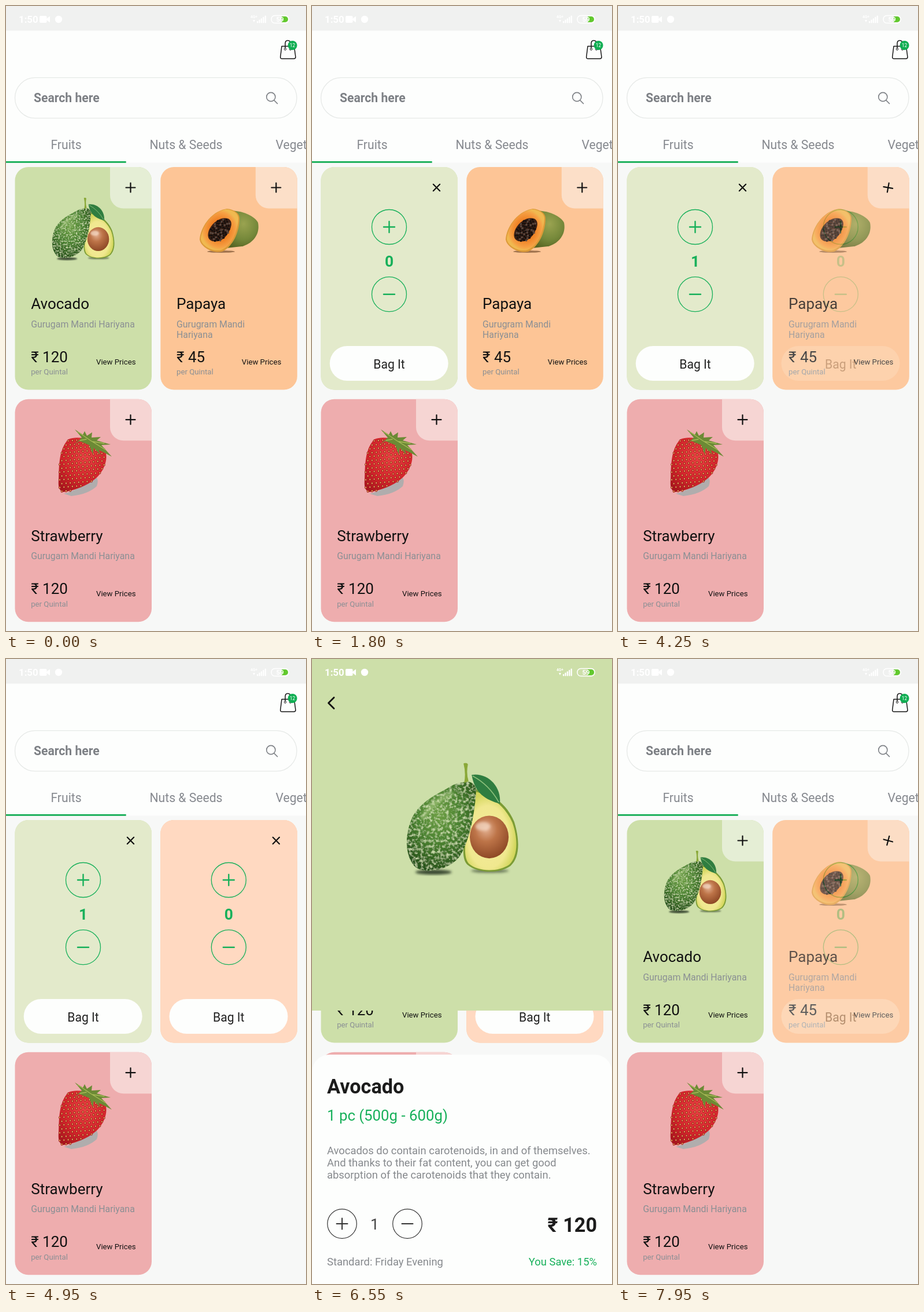
An HTML page that plays this animation: 519x1079 px, repeating every 8 s.

```html
<!DOCTYPE html>
<html lang="en">
<head>
<meta charset="utf-8">
<title>Fruit market</title>
<style>
html, body { margin: 0; width: 100%; height: 100%; overflow: hidden; background: #f7f8f7; }
svg { display: block; }
text { font-family: Roboto, sans-serif; }
.b { font-weight: 700; }
.mid { text-anchor: middle; }
.end { text-anchor: end; }
.line { fill: none; stroke-linecap: round; stroke-linejoin: round; }
</style>
</head>
<body>
<svg id="stage" width="519" height="1079" viewBox="0 0 519 1079">
  <defs>
    <radialGradient id="skin" cx=".46" cy=".36" r=".64">
      <stop offset="0" stop-color="#6fa046"/><stop offset=".5" stop-color="#4a8230"/><stop offset="1" stop-color="#28541b"/>
    </radialGradient>
    <radialGradient id="flesh" cx=".45" cy=".58" r=".55">
      <stop offset="0" stop-color="#f4ec9c"/><stop offset=".72" stop-color="#f0e88f"/><stop offset="1" stop-color="#d2d65c"/>
    </radialGradient>
    <radialGradient id="pit" cx=".42" cy=".32" r=".72">
      <stop offset="0" stop-color="#e3b091"/><stop offset=".4" stop-color="#bd7448"/><stop offset="1" stop-color="#8a4523"/>
    </radialGradient>
    <radialGradient id="rind" cx=".55" cy=".35" r=".7">
      <stop offset="0" stop-color="#9aa350"/><stop offset=".6" stop-color="#75883a"/><stop offset="1" stop-color="#566422"/>
    </radialGradient>
    <radialGradient id="pulp">
      <stop offset=".5" stop-color="#ef8226"/><stop offset=".85" stop-color="#f6a044"/><stop offset="1" stop-color="#f0b950"/>
    </radialGradient>
    <radialGradient id="berry" cx=".55" cy=".35" r=".75">
      <stop offset="0" stop-color="#e84443"/><stop offset=".6" stop-color="#d3252b"/><stop offset="1" stop-color="#a8161d"/>
    </radialGradient>
    <filter id="soft" x="-30%" y="-80%" width="160%" height="260%"><feGaussianBlur stdDeviation="2"/></filter>
    <filter id="rough" x="0" y="0" width="100%" height="100%">
      <feTurbulence type="fractalNoise" baseFrequency=".22" numOctaves="2" seed="4"/>
      <feColorMatrix values="0 0 0 0 .72  0 0 0 0 .85  0 0 0 0 .5  0 2.2 0 0 -1"/>
      <feComposite in2="SourceGraphic" operator="in" result="grain"/>
      <feMerge><feMergeNode in="SourceGraphic"/><feMergeNode in="grain"/></feMerge>
    </filter>

    <symbol id="avocado" viewBox="149 205 180 180">
      <g filter="url(#soft)" fill="#3b4a33">
        <ellipse cx="193" cy="379" rx="29" ry="4"/><ellipse cx="283" cy="377" rx="30" ry="3" opacity=".7"/>
      </g>
      <path d="M256 246C284 250 311 271 322 299C331 328 331 356 316 369C298 382 263 381 247 367C233 353 245 312 256 246Z" fill="#7c9c35"/>
      <path d="M256 250C282 254 307 273 319 300C329 328 327 355 314 367C297 379 264 379 249 365C237 350 247 312 256 250Z" fill="url(#flesh)"/>
      <path d="M240 236C250 232 262 238 261 250C259 286 250 332 234 355C216 377 180 382 164 371C146 352 147 317 160 290C174 264 203 253 219 243C227 238 233 237 240 236Z" fill="url(#skin)" filter="url(#rough)"/>
      <path class="line" d="M176 292Q190 268 222 254" stroke="#c3dc9b" stroke-width="7" opacity=".45" filter="url(#soft)"/>
      <ellipse cx="282" cy="323" rx="31" ry="34" fill="url(#pit)"/>
      <ellipse cx="272" cy="306" rx="12" ry="7" fill="#f6dcc8" opacity=".7" filter="url(#soft)"/>
      <path d="M241 206Q245 203 248 207Q245 221 249 234L242 237Q245 221 241 206Z" fill="#8aa838"/>
      <path d="M254 224C278 220 302 241 299 270C277 264 259 254 254 224Z" fill="#2f7d40"/>
      <path class="line" d="M256 226Q282 240 297 267" stroke="#8cbf7a" stroke-width="1.5"/>
    </symbol>
    <symbol id="papaya" viewBox="335 349 103 78">
      <ellipse cx="372" cy="424" rx="24" ry="2" fill="#7a5230" opacity=".7"/>
      <path d="M388 354C406 352 430 362 436 374C440 394 427 410 408 415L380 418Z" fill="url(#rind)"/>
      <path d="M382 350C394 351 404 357 404 367C404 390 392 416 374 424C357 428 337 416 335 403C336 385 352 355 382 350Z" fill="#dc9a38"/>
      <path d="M381 351C393 352 402 358 402 367C401 389 390 414 373 421C357 425 338 414 337 402C338 385 353 356 381 351Z" fill="url(#pulp)"/>
      <path d="M384 367C393 371 390 382 385 391C378 403 369 408 357 406C348 403 348 394 352 385C359 372 372 364 384 367Z" fill="#3a2016"/>
      <g id="pips"/>
    </symbol>
    <symbol id="strawberry" viewBox="90 730 94 117">
      <path d="M100 842Q130 834 152 812Q162 814 157 829Q142 843 113 846Z" fill="#b0adad"/>
      <path id="berryShape" d="M108 748C124 741 152 747 170 764C178 778 172 800 156 815C140 829 116 837 99 839C92 837 90 830 91 818C92 798 90 766 108 748Z" fill="url(#berry)"/>
      <g id="seeds"/>
      <path d="M119 731L133 740L136 734L140 742L149 736L148 745L164 744L157 750L181 757L165 758L183 778L160 766L164 775L152 763L150 774L144 758L127 751L118 757L131 745Z" fill="#6c8a35"/>
      <path class="line" d="M124 735L146 750L172 766M139 748L128 750M150 752L170 755" stroke="#a9bb58" stroke-width="1.3"/>
    </symbol>
  </defs>
</svg>
<script>
const GREEN = '#17b05a', LOOP = 8000;
const $ = id => document.getElementById(id);
const txt = (x, y, size, fill, s, cls = '') =>
  `<text x="${x}" y="${y}" font-size="${size}" fill="${fill}" class="${cls}">${s}</text>`;
const line = (d, stroke, w) => `<path class="line" d="${d}" stroke="${stroke}" stroke-width="${w}"/>`;
const round = (id, x, y, r, color, d, w, ring) =>
  `<circle id="${id}" cx="${x}" cy="${y}" r="${r}" fill="#000" fill-opacity="0" stroke="${color}" stroke-width="${ring}"/>` +
  line(`M${x - d} ${y}h${2 * d}` + (id.startsWith('plus') ? `M${x} ${y - d}v${2 * d}` : ''), color, w);

// Card drawn relative to its top left corner
function card(c) {
  const place = c.place.map((s, i) => txt(27.7, 276.5 + 18.7 * i, 15.86, '#8a8f94', s)).join('');
  const [ix, iy, iw, ih] = c.box;
  return `<g transform="translate(${c.x} ${c.y})">
    <rect width="236.5" height="384.5" rx="23" fill="${c.color}"/>
    <use href="#${c.fruit}" x="${ix - c.x}" y="${iy - c.y}" width="${iw}" height="${ih}"/>
    ${txt(27.7, 245, 26, '#111', c.name)}${place}
    ${txt(27.7, 336.5, 26, '#111', '₹ ' + c.price)}${txt(27.7, 358, 13.2, '#8a8f94', 'per Quintal')}
    ${txt(209, 340.5, 13.2, '#111', 'View Prices', 'end')}
    <path d="M164.5 0H213.5A23 23 0 0 1 236.5 23V71.5H187.5A23 23 0 0 1 164.5 48.5Z" fill="${c.corner}"/>
    <g id="over${c.id}" opacity="0">
      <rect width="236.5" height="384.5" rx="23" fill="${c.pale}"/>
      ${round('plus' + c.id, 118, 103.5, 30, GREEN, 9.5, 2.4, 1.3)}
      ${round('minus' + c.id, 118, 219.7, 30, GREEN, 9.5, 2.4, 1.3)}
      <text id="count${c.id}" x="118" y="171.5" font-size="26.4" fill="${GREEN}" class="b mid">0</text>
      <rect x="15.2" y="309" width="205" height="60" rx="30" fill="#fdfefd"/>
      ${txt(118, 347.5, 21.15, '#222', 'Bag It', 'mid')}
    </g>
    <g id="cross${c.id}">${line('M192 35.5h16M200 27.5v16', '#111', 2.2)}</g>
  </g>`;
}

const cards = [
  { id: 0, x: 15.5, y: 278, fruit: 'avocado', name: 'Avocado', price: 120, place: ['Gurugam Mandi Hariyana'],
    color: '#cddfa9', corner: '#e5eed5', pale: '#e3eacb', box: [79, 331, 109, 109] },
  { id: 1, x: 267.3, y: 278, fruit: 'papaya', name: 'Papaya', price: 45, place: ['Gurugram Mandi', 'Hariyana'],
    color: '#fdc596', corner: '#fcdfc8', pale: '#ffd9c1', box: [335, 349, 103, 78] },
  { id: 2, x: 15.5, y: 678.7, fruit: 'strawberry', name: 'Strawberry', price: 120, place: ['Gurugam Mandi Hariyana'],
    color: '#eeadae', corner: '#f6d5d3', pale: '#f6d5d3', box: [90, 730, 94, 117] }
];

const header = `
  <rect width="519" height="1079" fill="#f7f8f7"/><rect width="519" height="270.5" fill="#fdfefd"/>
  <rect width="519" height="42.5" fill="#f0f1f0"/>
  <rect x="15.5" y="123.7" width="487.5" height="70" rx="35" fill="#fdfefd" stroke="#e6e9e7" stroke-width="1.3"/>
  ${txt(48, 166.3, 21.15, '#7d8085', 'Search here', 'b')}
  <circle cx="458.3" cy="157" r="7.6" fill="none" stroke="#7d8085" stroke-width="1.6"/>${line('M464 163l5.5 5.5', '#7d8085', 1.7)}
  ${txt(104, 246.5, 21.15, '#86898f', 'Fruits', 'mid')}${txt(311.5, 246.5, 21.15, '#86898f', 'Nuts &amp; Seeds', 'mid')}
  ${txt(466.5, 246.5, 21.15, '#86898f', 'Vegetables')}
  <rect y="268" width="207.7" height="2.8" fill="#14ad55"/>
  ${line('M477 69.5H498.5L501 88Q501 91 498 91H477.5Q474.5 91 474.7 88ZM483 74V65Q483 59.5 487.5 59.5T492 65V74', '#151515', 1.5)}
  <circle cx="483" cy="74.5" r="1.7" fill="#fff" stroke="#151515"/><circle cx="492" cy="74.5" r="1.7" fill="#fff" stroke="#151515"/>
  <circle cx="495.6" cy="68" r="8" fill="#0fae52"/>${txt(495.6, 71, 8.5, '#fff', '12', 'mid')}`;

const status = `<g fill="#fff">${txt(22, 29, 16.8, '#fff', '1:50', 'b')}
  <rect x="58" y="17" width="12.5" height="12" rx="2"/><path d="M70 22l6-4.5v11l-6-4.5z"/><circle cx="91" cy="23" r="6.2"/>
  ${txt(423, 21, 6.5, '#fff', '4G+', 'b')}<path d="M427 24l2 4 2-4z"/>
  ${[0, 1, 2, 3, 4].map(i => `<rect x="${434 + i * 3.4}" y="${26 - i * 2.4}" width="2.3" height="${3.5 + i * 2.4}" rx="1"/>`).join('')}
  <rect x="459" y="16.5" width="30" height="13" rx="6" fill="none" stroke="#fff" stroke-width="1.5"/>
  <path d="M477 18h6a5 5 0 0 1 0 10h-6z" fill="#62c92e"/>${txt(474, 27, 11.5, '#fff', '59', 'mid b')}</g>`;

const about = ['Avocados do contain carotenoids, in and of themselves.',
  'And thanks to their fat content, you can get good', 'absorption of the carotenoids that they contain.'];
const detail = `
  <g id="hero"><rect id="heroBack" fill="#cddfa9"/><use id="heroFruit" href="#avocado"/></g>
  <g id="panel">
    <path d="M0 1600V713A30 30 0 0 1 30 683H489A30 30 0 0 1 519 713V1600Z" fill="#fdfefd"/>
    ${txt(26, 750, 34.2, '#1c1c1c', 'Avocado', 'b')}${txt(26, 797, 25.8, GREEN, '1 pc (500g - 600g)')}
    ${about.map((s, i) => txt(26, 855 + i * 21.1, 18.4, '#86898d', s)).join('')}
    ${round('plusDetail', 52, 975, 25.3, '#333', 9.5, 2, 1.2)}${round('minusDetail', 165, 975, 25.3, '#333', 9.5, 2, 1.2)}
    ${txt(108.5, 985, 26.4, '#444', '1', 'mid')}${txt(493, 988.5, 34.2, '#1c1c1c', '₹ 120', 'b end')}
    ${txt(26, 1046.5, 18.4, '#86898d', 'Standard: Friday Evening')}${txt(493, 1046.5, 18.4, GREEN, 'You Save: 15%', 'end')}
  </g>
  <g id="back">${line('M38 66.5L28.5 76L38 85.5', '#111', 2.8)}</g>`;

$('stage').insertAdjacentHTML('beforeend', header + cards.map(card).join('') + detail + status);

// Fruit seeds
let pips = '', seeds = '';
for (let i = 0; i < 70; i++) {
  const a = i * 2.4, r = Math.sqrt(i / 70), u = r * 22 * Math.cos(a), v = r * 15 * Math.sin(a);
  pips += `<circle cx="${370 + u * .62 + v * .78}" cy="${387 - u * .78 + v * .62}" r="1.7" fill="${i % 3 ? '#15100e' : '#5a4a42'}"/>`;
}
$('pips').innerHTML = pips;
const inside = new Path2D($('berryShape').getAttribute('d'));
const probe = document.createElement('canvas').getContext('2d');
for (let row = 0; row < 14; row++) for (let col = 0; col < 12; col++) {
  const x = 93 + col * 7.3 + (row % 2) * 3.6, y = 752 + row * 6.6 - col * .6;
  if (probe.isPointInPath(inside, x, y))
    seeds += `<ellipse cx="${x}" cy="${y}" rx="2" ry="2.2" fill="#9c141a"/><ellipse cx="${x}" cy="${y}" rx="1.1" ry="1.4" fill="#e0a85a"/>`;
}
$('seeds').innerHTML = seeds;

const ramp = (t, start, span) => Math.min(1, Math.max(0, (t - start) / span));
const ease = p => p < .5 ? 2 * p * p : 1 - 2 * (1 - p) ** 2;
const move = (t, start, span) => ease(ramp(t, start, span));
const mix = (a, b, p) => a + (b - a) * p;
const during = (t, a, b) => t >= a && t < b;
const set = (id, attrs) => { for (const k in attrs) $(id).setAttribute(k, attrs[k]); };

function flip(id, p) {
  set('over' + id, { opacity: p });
  set('cross' + id, { transform: `rotate(${45 * p} 200 35.5)` });
}

function draw(t) {
  flip(0, move(t, 1350, 300) - move(t, 5000, 300));
  flip(1, move(t, 4150, 300) - move(t, 7772, 300));
  $('count0').textContent = t < 2400 ? 0 : during(t, 2800, 3500) ? 2 : 1;
  set('plus0', { 'fill-opacity': during(t, 2250, 2400) || during(t, 2650, 2800) ? .08 : 0 });
  set('minus0', { 'fill-opacity': during(t, 3350, 3500) ? .08 : 0 });

  const p = move(t, 6021, 500) - move(t, 6956, 500);
  set('hero', { visibility: during(t, 6021, 7456) ? 'visible' : 'hidden' });
  const x = mix(15.5, 0, p), y = mix(278, 0, p), size = mix(109, 195, p);
  set('heroBack', { x, y, width: mix(252, 519, p) - x, height: mix(662.5, 607, p) - y, rx: mix(23, 0, p) });
  set('heroFruit', { x: mix(133.5, 260, p) - size / 2, y: mix(385.5, 277, p) - size / 2, width: size, height: size });

  const rise = move(t, 5934, 500), leave = 1 - ramp(t, 7340, 110);
  const shown = Math.min(1, rise * 1.15);
  set('panel', { opacity: shown * leave, transform: `translate(0 ${500 * (1 - rise)})` });
  set('back', { opacity: shown * leave, transform: `translate(33.3 76) scale(${shown}) translate(-33.3 -76)` });
}

const begin = performance.now();
function tick() {
  draw((performance.now() - begin) % LOOP);
  requestAnimationFrame(tick);
}
tick();
</script>
</body>
</html>
```
